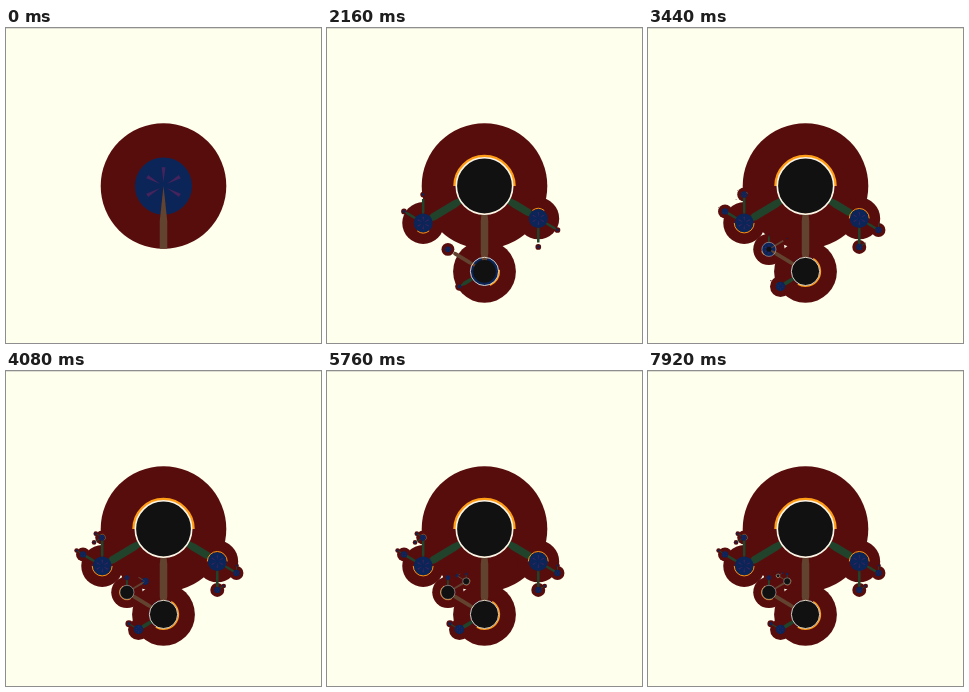
Animation, 315 px wide and 315 px high, one loop 8 s. Source, as an HTML page with a canvas:

```html
<!DOCTYPE html>
<html>
<head>
<meta charset="utf-8">
<style>
html, body { margin: 0; width: 100%; height: 100%; overflow: hidden; background: #ffffee; }
canvas { display: block; }
</style>
</head>
<body>
<canvas id="stage" width="315" height="315"></canvas>
<script>
const ctx = document.getElementById('stage').getContext('2d');
const LOOP = 8000, STEP = 80, PERIOD = 1380, TAU = Math.PI * 2;
const MAROON = '#580d0d', BLUE = '#0b2558', BROWN = '#624330', GREEN = '#21432b';
const FAR = 1.36, NEAR = 1.07;

const nodes = [{ x: 157.5, y: 158, r: 62.8, gen: 0, main: true, kids: [] }];

// Six directions, clockwise from lower right; reach is in parent radii
function sprout(parent, dir, reach, main = false) {
  const turn = (dir * 60 + 30) * Math.PI / 180;
  const angle = turn + 0.022 * Math.sin(2 * turn);
  const dist = parent.r * reach;
  const n = {
    parent, main, angle, dist, kids: [], gen: parent.gen + 1,
    x: parent.x + Math.cos(angle) * dist,
    y: parent.y + Math.sin(angle) * dist,
    r: parent.r / (main ? 2 : 3)
  };
  parent.kids.push(n);
  nodes.push(n);
  return n;
}

// A twig is [direction, near twig, far twig]
function twig(parent, [dir, ...subs], reach) {
  const n = sprout(parent, dir, reach);
  subs.forEach((sub, i) => twig(n, sub, i ? FAR : NEAR));
}

// The main chain zigzags; a side twig sits halfway round each bend
let tip = nodes[0], heading = 1;
for (const next of [1, 3, 5, 3, 5]) {
  const child = sprout(tip, next, FAR, true);
  const bend = (heading + next) / 2;
  if (tip === nodes[0]) {
    twig(tip, [2, [3, [3]], [4, [3], [2]]], 1.14);
    twig(tip, [0, [0, [4]], [1, [5]]], 1);
  } else {
    twig(tip, tip.gen === 1 ? [bend, [3]] : [bend], 0.93);
  }
  tip = child;
  heading = next;
}

const ramp = (t, from, to) => Math.max(0, Math.min(1, (t - from) / (to - from)));
const start = gen => (gen - 1) * PERIOD - 100;
// How far a node has grown out of its parent
const growth = (n, t) => n.parent ? ramp(t, start(n.gen) + 700, start(n.gen) + 1140) : 1;

function disc(n, r, color) {
  ctx.fillStyle = color;
  ctx.beginPath();
  ctx.arc(n.x, n.y, r, 0, TAU);
  ctx.fill();
}

function ring(n, r, width, color, from = 0, to = TAU) {
  ctx.strokeStyle = color;
  ctx.lineWidth = width;
  ctx.beginPath();
  ctx.arc(n.x, n.y, r, from, to);
  ctx.stroke();
}

function core(n, grow) {
  disc(n, n.r * 0.455 * grow, BLUE);
  ctx.fillStyle = '#45235c';
  for (let i = 0; i < 6; i++) {
    ctx.save();
    ctx.translate(n.x, n.y);
    ctx.rotate((i * 60 + 30) * Math.PI / 180);
    ctx.scale(n.r * grow, n.r * grow);
    ctx.beginPath();
    ctx.moveTo(0.06, 0);
    ctx.lineTo(0.3, -0.03);
    ctx.lineTo(0.3, 0.03);
    ctx.fill();
    ctx.restore();
  }
}

// A bar pointed at both centres, cut at its current length
function arm(n, t) {
  const { parent: p, dist, angle } = n, s = start(n.gen);
  const leftSide = !n.main && n.x < p.x;
  const reach = n.main ? ramp(t, s - 160, s)
    : leftSide ? ramp(t, s + 700, s + 860) : +(t >= s + 180);
  if (!reach) return;
  const edge = Math.min(p.r, dist);
  const len = edge * reach + (dist - edge) * growth(n, t);
  const half = p.r * 0.06, a = Math.min(p.r * 0.56, dist * 0.6);
  const b = Math.min(n.r * 0.56, dist - a);
  const width = d => half * Math.min(1, d / a, (dist - d) / b);
  const stops = [0, a, dist - b, len].filter(d => d <= len);
  ctx.save();
  ctx.translate(p.x, p.y);
  ctx.rotate(angle);
  ctx.fillStyle = n.main ? BROWN : GREEN;
  ctx.beginPath();
  for (const d of stops) ctx.lineTo(d, -width(d));
  for (const d of stops.reverse()) ctx.lineTo(d, width(d));
  ctx.fill();
  ctx.restore();
}

// Half ring facing away from the farthest child; the main chain turns black
function rim(n, t) {
  const kid = n.kids.find(k => k.dist > n.r * 1.3);
  const k = kid ? growth(kid, t) : 0;
  if (!k) return;
  const out = kid.angle + Math.PI, quarter = Math.PI / 2 * k;
  ring(n, n.r * 0.475, Math.max(0.35, n.r * 0.045), '#ff9d16', out - quarter, out + quarter);
  if (n.main) {
    disc(n, n.r * 0.44 * Math.min(1, k * 2), '#111111');
    ring(n, n.r * 0.449, Math.max(0.35, n.r * 0.026), '#fff5e2');
  }
}

function draw(t) {
  ctx.fillStyle = '#ffffee';
  ctx.fillRect(0, 0, 315, 315);
  ctx.fillStyle = '#deded2';
  ctx.fillRect(0, 0, 315, 1);
  const live = nodes.filter(n => growth(n, t) > 0);
  const arms = nodes.slice(1);
  for (const n of live) disc(n, n.r * growth(n, t), MAROON);
  for (const n of arms) if (!n.main) arm(n, t);
  for (const n of live) core(n, growth(n, t));
  for (const n of arms) if (n.main) arm(n, t);
  for (const n of live) rim(n, t);
}

const t0 = performance.now();
function tick() {
  const t = (performance.now() - t0) % LOOP;
  draw(Math.floor(t / STEP) * STEP);
  requestAnimationFrame(tick);
}
tick();
</script>
</body>
</html>
```
